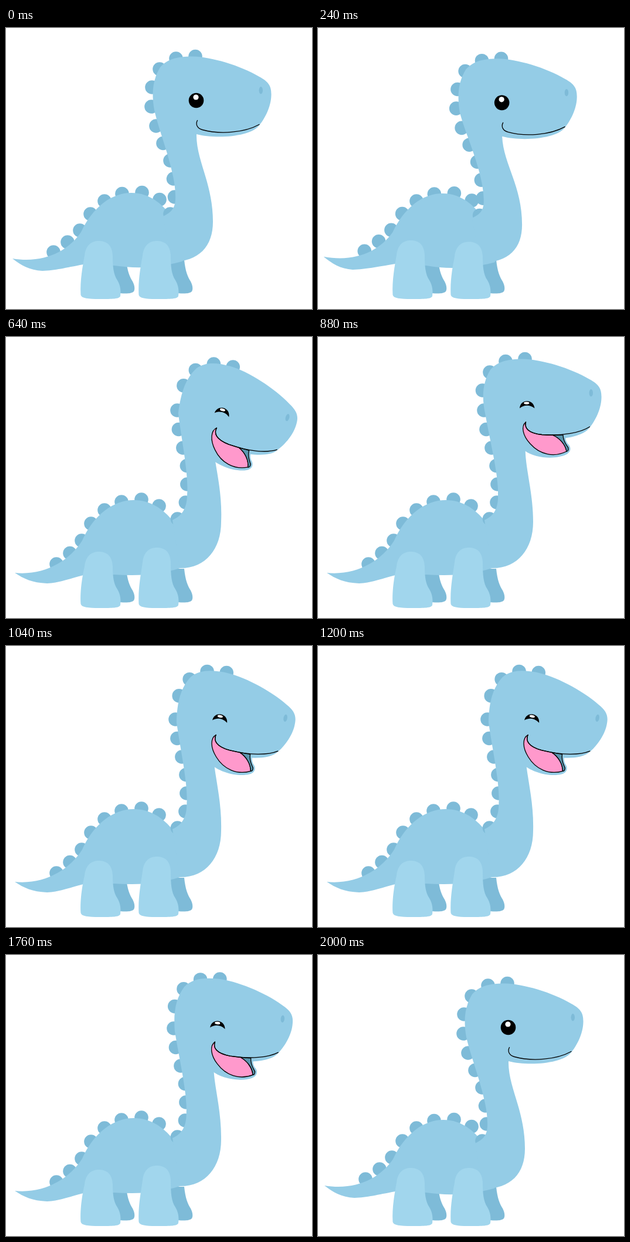
An HTML page for the animation above (2.32 s loop, 522 by 479 pixels).

```html
<!DOCTYPE html>
<html lang="en">
<head>
<meta charset="utf-8">
<title>Laughing dinosaur</title>
<style>
  html, body { margin: 0; width: 100%; height: 100%; overflow: hidden; background: #fff; }
  svg { display: block; width: 100vw; height: 100vh; }
  .skin { fill: #94cce6; }
  .dark { fill: #7ebbd8; }
  .leg { fill: #a1d6ed; }
  .line { fill: none; stroke: #000; stroke-width: 1.3; stroke-linecap: round; stroke-linejoin: round; }
</style>
</head>
<body>
<svg viewBox="0 0 522 479">
  <defs>
    <path id="farLeg" d="M180 395H205C207 415 211 424 216 432C220 440 220 446 218 449C214 453 205 453 194 452L180 440Z"/>
  </defs>
  <g class="dark">
    <use href="#farLeg"/>
    <use href="#farLeg" x="99"/>
  </g>
  <g id="backBumps" class="dark"></g>
  <path id="torso" class="skin"/>
  <g id="neckBumps" class="dark"></g>
  <path id="neck" class="skin"/>
  <g id="face">
    <ellipse class="dark" cx="465.8" cy="95.3" rx="3.2" ry="6.2"/>
    <g id="eyeOpen">
      <circle cx="355.5" cy="112.5" r="12.8"/>
      <circle cx="355" cy="107" r="4.6" fill="#fff"/>
    </g>
    <g id="eyeShut">
      <path d="M344 121.5C345 105 368 105 369.5 121.5C362 115 351 115 344 121.5Z"/>
      <ellipse cx="355.8" cy="112.6" rx="4.6" ry="2.2" fill="#fff"/>
    </g>
    <path id="smile" class="line" d="M357.5 146.5C354 153 357 160 366 162.5C395 170.5 437 168 463 153.5"/>
    <g id="laugh">
      <path class="skin" d="M353 160V194C370 207 405 209 423 200.500C434 195 431 186 426 182C422 176 422 172 422 166Z"/>
      <path class="line" style="fill:#ff99cc" d="M354.500 145C346 152 349 168 362 182C378 200 402 206 424 195C422 183 412 172 400 167L382 166.500C358 164 352 155 354.500 145Z"/>
      <path class="line" style="fill:#5b97b0" d="M400 167H418C418 178 424 184 427 189C427.500 193 426 195 424 195C422 183 412 172 400 167Z"/>
      <path class="line" d="M354.500 145C352 155 358 164 382 166.500C418 169 448 163 463.500 153"/>
    </g>
  </g>
  <path id="hindLeg" class="leg"/>
  <path id="foreLeg" class="leg"/>
</svg>
<script>
const STEP = 80, LOOP = 2320, NOD_ANGLE = 15.75, PIVOT = [321, 168];
const $ = id => document.getElementById(id);
const mix = (a, b, t) => a + (b - a) * t;

// Each shape has a resting form and a stretched form with matching points.
const torso = [
  'M11 393C65 402 106 380 128 348C148 305 180 281 214 281C242 281 264 297 280 318L330 360L300 398C255 410 220 410 185 405L132 403C100 409 85 413 62 414C40 413 25 404 11 393Z',
  'M15 402C65 407 108 382 130 347C150 302 184 278 218 278C246 278 268 293 286 315L330 360L297 394C255 407 220 407 185 405L132 406C105 413 90 419 70 420C45 419 30 412 15 402Z'
];
const neck = [
  'M268 321C283 314 290 306 289 285C288 240 262 180 253 140C248 112 250 88 263 67C275 53 292 48.5 318 48.5C350 49 400 64 432 83C449 92 453 100 452.5 115C452 135 441 155 432 166C418 185 360 190 325 181C324 225 353 265 353 330C353 372 330 398 282 399Z',
  'M284 312C300 305 308 292 307 268C308 235 294 180 285 130C279 101 281 77 294 56C306 42 323 37.5 349 37.5C381 38 431 53 463 72C480 81 484 89 483.5 104C483 124 472 144 463 155C449 174 391 179 356 170C347 205 367 255 367 315C367 362 340 395 296 394Z'
];
const backBumps = [
  '81 382 105 365 126 345 144 317 168 295 198 282.5 232 280.5 262 292.5',
  '86 387 109 368.5 129 347 145 318 168 295 197 281 231 277 261 288'
];
const neckBumps = [
  '280 317 287.5 288 285.5 257 280 226 268 196.500 256 167 248 134 249 101 262 70 290 52 323 48.500',
  '292.500 310 305 282 306 251 304 219.500 296 189 287 157.500 283 125 280.500 91 293 60 320 41.500 353 37.500'
];

const points = text => {
  const n = text.match(/[\d.]+/g).map(Number), out = [];
  for (let i = 0; i < n.length; i += 2) out.push([n[i], n[i + 1]]);
  return out;
};
const blend = (forms, t) => {
  const [from, to] = forms.map(points);
  return from.map((p, i) => [mix(p[0], to[i][0], t), mix(p[1], to[i][1], t)]);
};
const toPath = (template, pts) => {
  let i = 0;
  return template.replace(/[\d.]+ [\d.]+/g, () => pts[i++].map(v => v.toFixed(2)).join(' '));
};

// The head turns rigidly; the neck leans less towards its base.
function bend([x, y], nod) {
  if (!nod) return [x, y];
  if (y < 115 || (x > 340 && y < 190)) {
    const a = nod * NOD_ANGLE * Math.PI / 180, dx = x - PIVOT[0], dy = y - PIVOT[1];
    return [PIVOT[0] + dx * Math.cos(a) - dy * Math.sin(a),
            PIVOT[1] + dx * Math.sin(a) + dy * Math.cos(a)];
  }
  return [x + nod * 9 * Math.max(0, 310 - y) / 185, y];
}

function drawBumps(id, pts) {
  const group = $(id);
  pts.forEach(([x, y], i) => {
    let dot = group.children[i];
    if (!dot) {
      dot = group.appendChild(document.createElementNS('http://www.w3.org/2000/svg', 'circle'));
      dot.setAttribute('r', 11.8);
    }
    dot.setAttribute('cx', x);
    dot.setAttribute('cy', y);
  });
}

function drawLeg(id, x, lift) {
  const top = 363 + lift, knee = 388 + lift;
  $(id).setAttribute('d', `M127.5 455C126 430 131 405 134 ${knee}C136 ${top + 7} 146 ${top} 158 ${top}` +
    `C172 ${top} 181 ${top + 7} 182 ${knee}C182 405 183 420 190 430C196 440 196 450 195 457` +
    'C193 462 182 462 160 462C140 462 129 461 127.5 455Z');
  $(id).setAttribute('transform', `translate(${x})`);
}

function stretchAt(k) {
  if (k < 3 || k > 24) return 0;
  if (k === 3) return -0.35;
  if (k === 4) return 0.35;
  return k === 24 ? 0.5 : 1;
}

const show = (id, on) => $(id).setAttribute('visibility', on ? 'visible' : 'hidden');

function draw(k) {
  const stretch = stretchAt(k);
  const nod = k >= 5 && k <= 23 ? 1 - Math.abs((k - 5) % 6 / 3 - 1) : 0;
  const laughing = k >= 6 && k <= 23, shut = k >= 5 && k <= 24;

  $('torso').setAttribute('d', toPath(torso[0], blend(torso, stretch)));
  $('neck').setAttribute('d', toPath(neck[0], blend(neck, stretch).map(p => bend(p, nod))));
  drawBumps('backBumps', blend(backBumps, stretch));
  drawBumps('neckBumps', blend(neckBumps, stretch).map(p => bend(p, nod)));
  drawLeg('hindLeg', 0, 3 * stretch);
  drawLeg('foreLeg', 99, -4 * stretch);

  $('face').setAttribute('transform',
    `translate(${31 * (stretch - 1)} ${11 * (1 - stretch)}) rotate(${nod * NOD_ANGLE} ${PIVOT})`);
  show('eyeOpen', !shut);
  show('eyeShut', shut);
  show('smile', !laughing);
  show('laugh', laughing);
}

const start = performance.now();
let last = -1;
function tick() {
  const k = Math.floor((performance.now() - start) % LOOP / STEP);
  if (k !== last) draw(last = k);
  requestAnimationFrame(tick);
}
tick();
</script>
</body>
</html>
```
